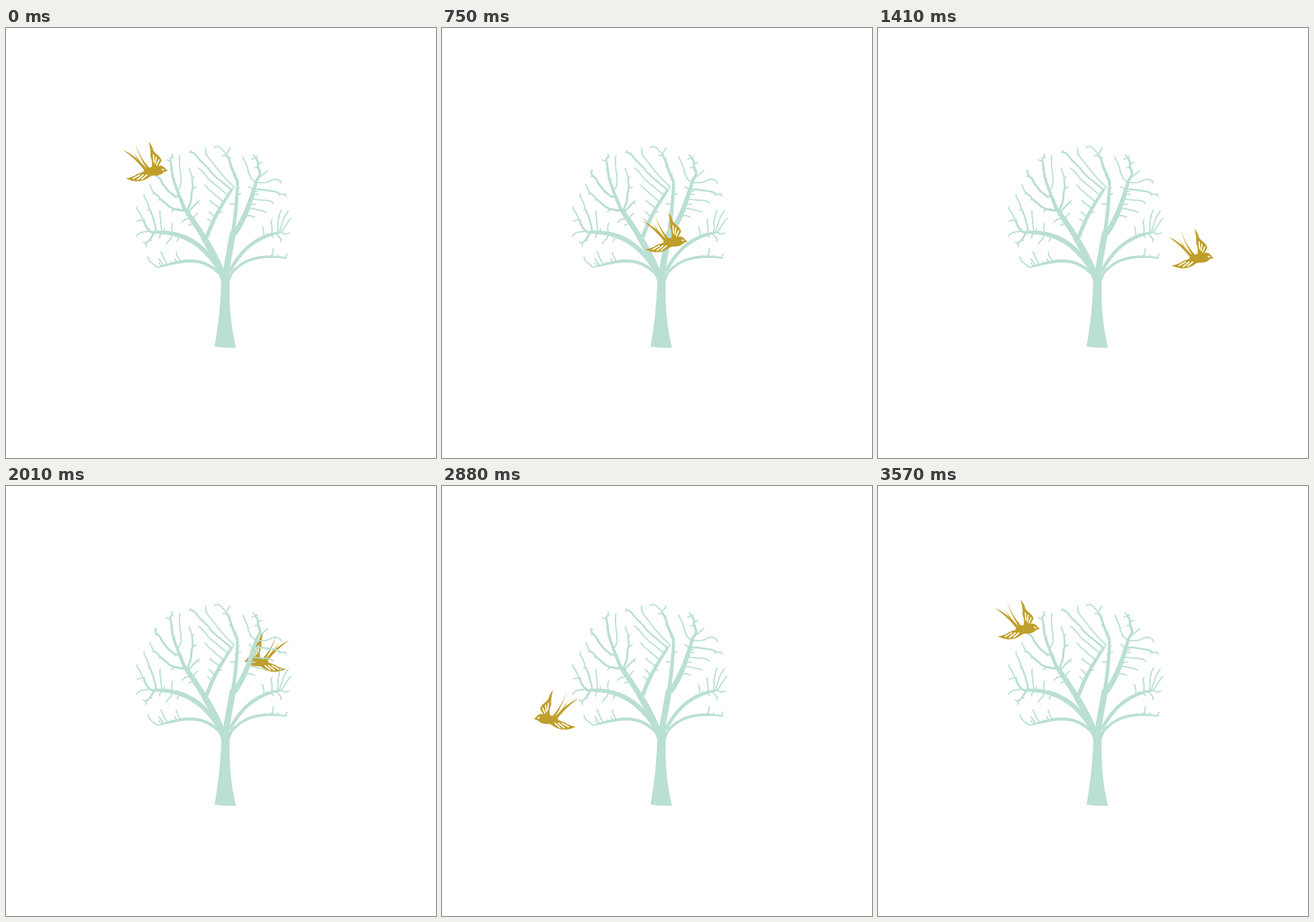
Write an HTML page with a canvas that moves like this. It is 600 by 600 pixels and loops after 3600 ms.

```html
<!DOCTYPE html>
<html lang="en">
<head>
<meta charset="utf-8">
<title>Bird around a tree</title>
<style>
html, body { margin: 0; width: 100%; height: 100%; overflow: hidden; background: #fff; }
canvas { display: block; width: 600px; height: 600px; }
</style>
</head>
<body>
<canvas id="stage" width="600" height="600"></canvas>
<script>
const LOOP = 3600, STEP = 30;
const GREEN = '#badfd3', GOLD = '#bf9f2b';
const ctx = document.getElementById('stage').getContext('2d');

function seeded(seed) {
  return () => (seed = seed * 16807 % 2147483647) / 2147483647;
}

// ---- Tree: a few main limbs, then twigs that grow towards free space.

const CROTCH = { x: 306, y: 350 };
const CROWN = { x: 290, y: 270, rx: 113, ry: 110 };

// Main limbs as cubic curves.
const limbs = [
  [306, 350, 310, 312, 322, 275, 323, 214],
  [303, 346, 290, 312, 268, 278, 249, 252],
  [301, 342, 277, 303, 250, 283, 203, 285],
  [302, 347, 274, 315, 245, 325, 212, 334],
  [280, 292, 291, 262, 300, 248, 318, 222],
  [312, 340, 330, 306, 352, 290, 384, 285],
  [311, 347, 330, 320, 358, 316, 392, 321],
  [318, 288, 336, 262, 342, 238, 350, 212]
];

function nearest(nodes, p) {
  let best = null, dist = Infinity;
  for (const n of nodes) {
    const d = Math.hypot(n.x - p.x, n.y - p.y);
    if (d < dist) { dist = d; best = n; }
  }
  return { node: best, dist };
}

function addNode(nodes, parent, x, y) {
  const node = { x, y, parent, kids: 0, load: 0 };
  if (parent) parent.kids++;
  nodes.push(node);
  return node;
}

function addLimb(nodes, [x0, y0, x1, y1, x2, y2, x3, y3]) {
  let last = nearest(nodes, { x: x0, y: y0 }).node;
  const n = 36;
  for (let i = 1; i <= n; i++) {
    const u = i / n, v = 1 - u;
    const mix = (a, b, c, d) =>
      v * v * v * a + 3 * v * v * u * b + 3 * v * u * u * c + u * u * u * d;
    last = addNode(nodes, last, mix(x0, x1, x2, x3), mix(y0, y1, y2, y3));
  }
}

// Evenly scattered goals inside the crown, none close under the crotch.
function scatterGoals(count) {
  const rnd = seeded(41), goals = [];
  for (let i = 0; i < count; i++) {
    const a = i * 2.39996, r = Math.sqrt((i + 0.5) / count);
    const x = CROWN.x + CROWN.rx * r * Math.cos(a) + 5 * (rnd() - 0.5);
    const y = CROWN.y + CROWN.ry * r * Math.sin(a) + 5 * (rnd() - 0.5);
    const low = 340 - 0.09 * (x - 190);
    const open = Math.hypot(x - CROTCH.x, y - 325) > 62;
    if (y < low && x < 402 && open) goals.push({ x, y });
  }
  return goals;
}

function growTwigs(nodes, goals) {
  const step = 3, reach = 5;
  for (let round = 0; round < 70 && goals.length; round++) {
    const pulls = new Map();
    for (const g of goals) {
      const { node, dist } = nearest(nodes, g);
      const p = pulls.get(node) || { x: 0, y: 0 };
      p.x += (g.x - node.x) / dist;
      p.y += (g.y - node.y) / dist;
      pulls.set(node, p);
    }
    for (const [n, p] of pulls) {
      if (n.kids > 2) continue;
      // Twigs also lean away from the crotch.
      const out = Math.hypot(n.x - CROTCH.x, n.y - CROTCH.y) || 1;
      const dx = p.x + 0.6 * (n.x - CROTCH.x) / out;
      const dy = p.y + 0.6 * (n.y - CROTCH.y) / out;
      const len = Math.hypot(dx, dy) || 1;
      addNode(nodes, n, n.x + step * dx / len, n.y + step * dy / len);
    }
    goals = goals.filter(g => nearest(nodes, g).dist > reach);
  }
}

function makeTree() {
  const c = document.createElement('canvas');
  c.width = c.height = 600;
  const g = c.getContext('2d');
  g.fillStyle = g.strokeStyle = GREEN;
  g.lineCap = 'round';
  g.fill(new Path2D('M291 444.500Q299 400 300.500 354L297 344H316L312 353Q311 408 321 446Q306 447 291 444.500Z'));

  const nodes = [];
  addNode(nodes, null, CROTCH.x, CROTCH.y);
  limbs.forEach(l => addLimb(nodes, l));
  growTwigs(nodes, scatterGoals(330));

  // Every branch is as thick as the tips it carries.
  for (const n of nodes.slice(1).reverse()) {
    n.load = n.load || 1;
    n.parent.load += n.load;
    g.lineWidth = Math.min(11, 1.7 * n.load ** 0.45);
    g.beginPath();
    g.moveTo(n.parent.x, n.parent.y);
    g.lineTo(n.x, n.y);
    g.stroke();
  }
  return c;
}

// ---- Bird

// Key points of the flight: time, x, y.
const route = [
  [0, 194.5, 186], [540, 275, 262], [1080, 372, 311], [1410, 437, 307.5],
  [1510, 445, 290], [1620, 441, 252], [1800, 411, 218], [2010, 363.5, 231.5],
  [2400, 272.5, 280], [2880, 159.5, 312], [3110, 130, 275], [3240, 134, 238],
  [3400, 154, 198], [3570, 194.5, 186]
];
// Nose-up turns: begin, moment of flip, end.
const turns = [[1410, 1635, 1900], [2920, 3240, 3540]];

function slope(i, k) {
  const a = route[Math.max(i - 1, 0)], b = route[Math.min(i + 1, route.length - 1)];
  return (b[k] - a[k]) / (b[0] - a[0]);
}

function place(t, k) {
  const i = Math.max(1, route.findIndex(p => p[0] >= t)) - 1;
  const a = route[i], b = route[i + 1], d = b[0] - a[0];
  const u = (t - a[0]) / d, v = 1 - u;
  return v * v * (1 + 2 * u) * a[k] + u * u * (3 - 2 * u) * b[k] +
    d * u * v * (v * slope(i, k) - u * slope(i + 1, k));
}

function tilt(t) {
  for (const [a, m, b] of turns) {
    const u = t < m ? (t - a) / (m - a) : (b - t) / (b - m);
    if (u > 0) return -1.95 * u * u * (3 - 2 * u);
  }
  return 0;
}

const plumage = [
  'M31.500 13Q28 11.500 27 9Q23 4 17 7.500Q8 7 0 10L-3 14Q4 20 13 20Q22 20 26 15Z',
  'M8 11Q11 2 7 -7Q8 -15 4.500 -27.500Q10 -21 11 -15Q14 -11 18 -8Q21 -6 22.500 -1Q20 4 17 9Z',
  'M-31.500 -16Q-14 -9 2 11L-1 13Q-14 -4 -31.500 -16Z',
  'M-14.500 -26Q-9 -7 6 10L3 12Q-10 -8 -14.500 -26Z',
  'M-17 -14Q-11 -2 3 11L0 13Q-11 0 -17 -14Z',
  'M-27.500 24Q-17 22 -12 18Q-4 15 2 13L14 18Q6 21 1 25Q-5 28 -13 28Q-21 27 -27.500 24Z'
].map(d => new Path2D(d));
const slits = new Path2D('M11 -9L12 1M15 -6L14 3M19 -2L16 5M-17 24L-8 19M-11 25.500L-3 19M-5 25L2 19');

function drawBird(t, back) {
  ctx.save();
  ctx.translate(place(t, 1), place(t, 2));
  if (back) ctx.scale(-1, 1);
  ctx.rotate(tilt(t));
  ctx.fillStyle = GOLD;
  plumage.forEach(p => ctx.fill(p));
  ctx.strokeStyle = ctx.fillStyle = '#fff';
  ctx.lineWidth = 1.7;
  ctx.lineCap = 'round';
  ctx.stroke(slits);
  ctx.beginPath();
  ctx.ellipse(24.5, 11.5, 1.8, 1, 0.5, 0, 7);
  ctx.fill();
  ctx.restore();
}

const tree = makeTree();

function frame() {
  const t = Math.floor(performance.now() % LOOP / STEP) * STEP;
  const back = t >= turns[0][1] && t < turns[1][1];
  ctx.fillStyle = '#fff';
  ctx.fillRect(0, 0, 600, 600);
  if (back) drawBird(t, back);
  ctx.drawImage(tree, 0, 0);
  if (!back) drawBird(t, back);
  requestAnimationFrame(frame);
}
frame();
</script>
</body>
</html>
```
